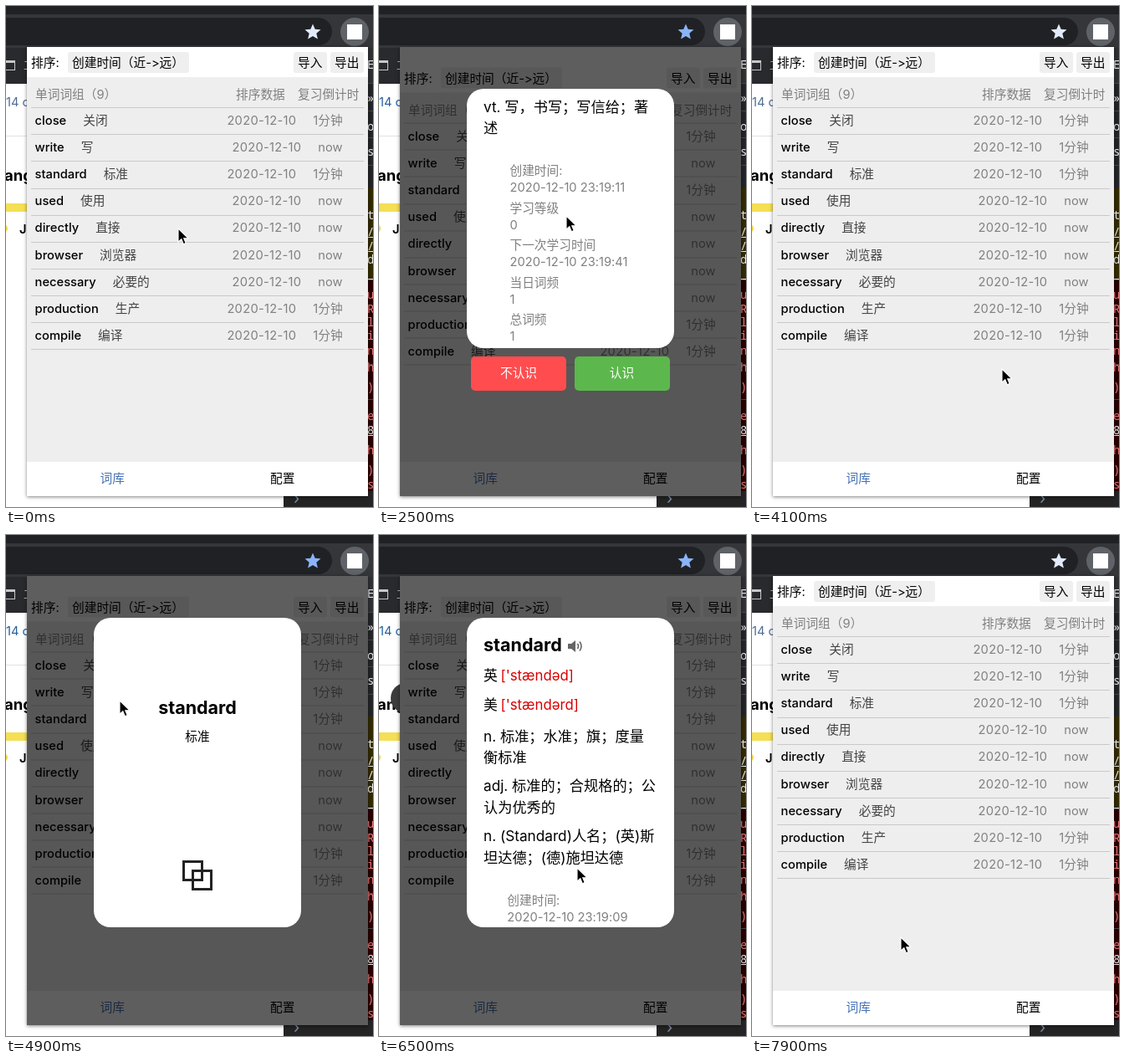
An HTML page that plays this animation: 439 by 599 pixels, repeating every 8000 ms.

```html
<!DOCTYPE html>
<html lang="zh-CN">
<head>
<meta charset="utf-8">
<title>单词卡片</title>
<style>
html, body { margin: 0; width: 100%; height: 100%; overflow: hidden; }
#stage {
  position: relative; width: 439px; height: 599px; overflow: hidden; background: #fff;
  font: 14.7px/20px Inter, "Noto Sans CJK SC", "Noto Sans CJK", sans-serif; color: #000;
  font-feature-settings: "calt" 0;
}
#stage div, #stage svg, .t { position: absolute; box-sizing: border-box; }
.t { white-space: pre; }
.gray { color: #808080; }
.mono { font-family: "Noto Sans Mono", monospace; font-size: 14px; }

#tabs { left: 0; top: 0; width: 439px; height: 10px; background: #202124; }
#bar { left: 0; top: 10px; width: 439px; height: 40px; background: #35363a; }
#omni { left: -20px; top: 14px; width: 410px; height: 33px; border-radius: 17px; background: #202124; }
#ext { left: 400px; top: 14px; width: 34px; height: 34px; border-radius: 50%; background: #5f6368; }
#ext div { left: 8px; top: 8px; width: 18px; height: 18px; background: #fff; }
.star { fill: #e2ebfb; animation: star 8s linear infinite; }
.stamp { color: #4d6c96; animation: stamp 8s linear infinite; }

#panel, #edge { left: 25px; top: 49px; width: 408px; height: 537px; }
#panel { overflow: hidden; background: #fff; }
#edge { box-shadow: 0 1px 4px rgba(0,0,0,.5); }
/* Panel children use stage coordinates. */
#inner { left: -25px; top: -49px; width: 439px; height: 599px; }
#list { left: 0; top: 0; width: 439px; height: 545px; animation: shift 8s linear infinite; }
#body { left: 25px; top: 85px; width: 408px; height: 470px; background: #eee; }
.box { background: #efefef; border-radius: 3px; height: 25px; top: 55px; }
.line { left: 30px; width: 398px; height: 1px; background: #c9c9c9; }
.row { left: 34.6px; width: 368px; display: flex; gap: 20px; white-space: pre; }
.row .word { font-weight: 450; }
.row .mean { font-weight: 300; color: #444; }
.end { right: 0; top: 0; display: flex; gap: 20px; color: #808080; }
.date { letter-spacing: .27px; }
.before { animation: before 8s step-end infinite; }
.after { animation: after 8s step-end infinite; }
#foot { left: 25px; top: 545px; width: 408px; height: 41px; background: #fff; }
#dim { inset: 0; background: rgba(0,0,0,.63); animation: card1 8s linear infinite; }
#dim.two { animation-name: card2; }
.shade { inset: 0; background: rgba(0,0,0,.63); }
.fade1 { animation: card1 8s linear infinite; }
.fade2 { animation: card2 8s linear infinite; }

.card { left: 105px; top: 99px; width: 248px; perspective: 900px; }
#c1 { height: 310px; }
#c2 { height: 370px; }
.flip { inset: 0; transform-style: preserve-3d; }
#c1 .flip { animation: flip1 8s ease-in-out infinite; }
#c2 .flip { animation: flip2 8s ease-in-out infinite; }
.face { inset: 0; border-radius: 20px; background: #fff; overflow: hidden; backface-visibility: hidden; }
.back { transform: rotateY(180deg); }
.mid { left: 0; right: 0; text-align: center; }
.big { font-size: 21.5px; font-weight: 700; }
.def { font-size: 17.2px; line-height: 25.3px; }
.ipa { color: #d80000; }
.meta { left: 122px; transform: translateX(-50%); line-height: 20px; }
.meta p { margin: 0 0 4.5px; white-space: pre; }
.scroll { inset: 0; }
#c1 .scroll { animation: scroll1 8s ease-in-out infinite; }
#c2 .scroll { animation: scroll2 8s ease-in-out infinite; }
.btn {
  top: 320px; width: 114px; height: 41px; border-radius: 5px; color: #fff;
  font-weight: 500; line-height: 41px; text-align: center;
}
#ball {
  left: 14px; top: 177px; width: 36px; height: 36px; border-radius: 50%;
  background: #3c3c3c; animation: ball 8s step-end infinite;
}
#mouse { left: 0; top: 0; animation: mouse 8s ease-in-out infinite; }

@keyframes shift { 0%, 4.9%, 47.6%, 56.2%, 95.1%, 100% { transform: none; }
  5%, 47.5%, 56.25%, 95% { transform: translateY(18.5px); } }
@keyframes star { 0%, 4.9%, 47.6%, 56.2%, 95.1%, 100% { fill: #e2ebfb; }
  5%, 47.5%, 56.25%, 95% { fill: #8ab4f8; } }
@keyframes stamp { 0%, 4.9%, 47.6%, 56.2%, 95.1%, 100% { color: #4d6c96; }
  5%, 47.5%, 56.25%, 95% { color: #235f9e; } }
@keyframes card1 { 0%, 5%, 49%, 100% { opacity: 0; } 7.4%, 46.25% { opacity: 1; } }
@keyframes card2 { 0%, 56.25%, 96.5%, 100% { opacity: 0; } 58.7%, 93.75% { opacity: 1; } }
@keyframes flip1 { 0%, 13.75% { transform: none; } 21.25%, 100% { transform: rotateY(180deg); } }
@keyframes flip2 { 0%, 70% { transform: none; } 78.75%, 100% { transform: rotateY(180deg); } }
@keyframes scroll1 { 0%, 24.4% { transform: none; } 27.5%, 100% { transform: translateY(-120px); } }
@keyframes scroll2 { 0%, 82.5% { transform: none; } 88.75%, 100% { transform: translateY(-180px); } }
@keyframes before { 0% { opacity: 1; } 46.25%, 100% { opacity: 0; } }
@keyframes after { 0% { opacity: 0; } 46.25%, 100% { opacity: 1; } }
@keyframes ball { 0% { opacity: 0; } 78.75% { opacity: 1; } 93.75%, 100% { opacity: 0; } }
@keyframes mouse {
  0% { transform: translate(206px, 266px); }
  5%, 7.5% { transform: translate(165px, 176px); }
  13.75%, 24.4% { transform: translate(225px, 346px); }
  27.5%, 31.25% { transform: translate(224px, 251px); }
  45% { transform: translate(298px, 436px); }
  51.25% { transform: translate(299px, 434px); }
  56.25% { transform: translate(135px, 200px); }
  61.25% { transform: translate(136px, 198px); }
  70%, 78.75% { transform: translate(235px, 402px); }
  81.25%, 88.75% { transform: translate(237px, 398px); }
  93.75%, 100% { transform: translate(178px, 481px); }
}
</style>
</head>
<body>
<div id="stage">
  <div id="page"></div>
  <div id="tabs"></div>
  <div id="bar"></div>
  <div id="omni"></div>
  <svg style="left:357px;top:21px" width="20" height="20" viewBox="-10 -10 20 20">
    <path class="star" d="M0-9.5 2.7-3.2 9.5-2.7 4.3 1.8 5.9 8.5 0 4.9-5.9 8.5-4.3 1.8-9.5-2.7-2.7-3.2Z"/>
  </svg>
  <div id="ext"><div></div></div>
  <div id="ball"></div>
  <div id="edge"></div>
  <div id="panel">
    <div id="inner">
      <div id="list">
        <div id="body"></div>
        <div class="box" style="left:74px;width:145px"></div>
        <div class="box" style="left:344px;width:40px"></div>
        <div class="box" style="left:388px;width:40px"></div>
      </div>
      <div id="foot"></div>
    </div>
    <div class="shade fade1"></div>
    <div class="shade fade2"></div>
  </div>

  <div id="c1" class="card fade1">
    <div class="flip">
      <div class="face">
        <div class="mid big" style="top:83px">write</div>
      </div>
      <div class="face back"><div class="scroll"></div></div>
    </div>
    <div class="btn" style="left:5px;background:#ff4d4f">不认识</div>
    <div class="btn" style="left:128.5px;background:#5cb84c">认识</div>
  </div>

  <div id="c2" class="card fade2">
    <div class="flip">
      <div class="face">
        <div class="mid big" style="top:97px">standard</div>
        <div class="mid" style="top:132px">标准</div>
      </div>
      <div class="face back"><div class="scroll"></div></div>
    </div>
  </div>

  <svg id="mouse" width="16" height="22" viewBox="-1 -1 16 22" style="margin:-1px">
    <path d="M0 0V16.2L3.8 12.7 6.3 18.8 9.2 17.6 6.7 11.7H11.8Z" fill="#000" stroke="#fff" stroke-width="1.1"/>
  </svg>
</div>
<script>
const $ = s => document.querySelector(s);
const add = (to, html) => to.insertAdjacentHTML('beforeend', html);
// Places a line of text by its left edge and vertical centre.
const text = (to, x, y, str, cls = '', css = '') =>
  add(to, `<span class="t ${cls}" style="left:${x}px;top:${y - 10}px;${css}">${str}</span>`);
const rect = (to, x, y, w, h, fill) =>
  add(to, `<div style="left:${x}px;top:${y}px;width:${w}px;height:${h}px;background:${fill}"></div>`);

// Page and developer tools around the popup
const page = $('#page');
rect(page, 0, 50, 25, 43, '#292a2d');
add(page, '<div style="left:-3px;top:65px;width:14px;height:12px;border:1.5px solid #c8c8c8;border-top-width:3px"></div>');
text(page, 21, 70, '工', '', 'color:#bbb;font-size:13px');
text(page, 0, 115, '14 c', 'stamp');
rect(page, 0, 155, 25, 1, '#e2e2e2');
text(page, -2, 202, 'ang', '', 'font-size:18.5px;font-weight:700');
rect(page, 0, 236, 25, 10, '#f4df55');
add(page, '<div style="left:-8px;top:261px;width:10px;height:10px;border-radius:50%;background:#f4d84a"></div>');
text(page, 16, 267, 'J', '', 'font-weight:600');
rect(page, 332, 580, 107, 19, '#242424');
text(page, 344, 589, '›', '', 'font-size:19px;color:#7d8ea5');
rect(page, 433, 50, 6, 549, '#242528');
rect(page, 433, 50, 6, 42, '#303134');
rect(page, 433, 217, 6, 110, '#332b00');
rect(page, 433, 328, 6, 252, '#290000');
for (const y of [92, 125, 157, 190, 428, 470]) rect(page, 433, y, 6, 1, '#484848');
const side = [['E', 70], ['»', 110], ['op', 144], ['s', 174], ['t', 250], ['/', 270], ['/', 287], ['d', 303], ['_', 320],
  ['u', 345], ['R', 362], ['l', 378], ['i', 394], ['n', 412], ['h', 432], [')', 455], ['e', 490], ['8', 507], ['h', 531], [')', 554], ['s', 572]];
for (const [s, y] of side) {
  const color = y > 330 && s !== '8' ? '#f07878' : '#eee';
  const under = '/8'.includes(s) ? 'underline' : 'none';
  text(page, 432, y, s, 'mono', `color:${color};text-decoration:${under}`);
}

// Word list
const list = $('#list'), today = '2020-12-10', pitch = 32.1;
text(list, 30, 68, '排序:');
text(list, 79, 68, '创建时间（近-&gt;远）');
text(list, 349, 68, '导入');
text(list, 393, 68, '导出');
text(list, 35, 106, '单词词组（9）', 'gray');
text(list, 275, 106, '排序数据', 'gray');
text(list, 349, 106, '复习倒计时', 'gray');
rect(list, 30, 121, 398, 1, '#c9c9c9');

const end = (left, cls = '') => `<div class="end ${cls}"><span class="date">${today}</span><span>${left}</span></div>`;
const soon = '1分钟';
const words = [
  ['close', '关闭', soon], ['write', '写'], ['standard', '标准', soon],
  ['used', '使用', 'now'], ['directly', '直接', 'now'], ['browser', '浏览器', 'now'],
  ['necessary', '必要的', 'now'], ['production', '生产', soon], ['compile', '编译', soon]
];
words.forEach(([word, mean, left], i) => {
  const tail = left ? end(left) : end('now', 'before') + end(soon, 'after');
  add(list, `<div class="row" style="top:${127 + i * pitch}px">
    <span class="word">${word}</span><span class="mean">${mean}</span>${tail}</div>
    <div class="line" style="top:${Math.round(153.3 + i * pitch)}px"></div>`);
});
text($('#inner'), 112.5, 565, '词库', '', 'color:#4772b5');
text($('#inner'), 316, 565, '配置');

// Cards
const icon = `<svg style="left:106px;bottom:44px" width="36" height="36" fill="none" stroke="#222" stroke-width="3">
  <path d="M1.5 1.5H23.5V23.5H1.5ZM12.5 12.5H34.5V34.5H12.5Z"/></svg>`;
const speaker = `<svg width="18" height="16" viewBox="0 0 18 16" fill="none" stroke="#666" stroke-width="1.6">
  <path d="M0 5H4L9 1V15L4 11H0Z" fill="#666" stroke="none"/><path d="M11.5 5Q13.5 8 11.5 11M14 2.5Q18 8 14 13.5"/></svg>`;

function fill(id, word, speakerX, ipa, defs, meta) {
  const back = $(id + ' .scroll');
  add($(id + ' .face'), icon);
  text(back, 20, 32, word, 'big');
  add(back, `<div style="left:${speakerX}px;top:26px">${speaker}</div>`);
  ['英', '美'].forEach((c, i) =>
    text(back, 20, 69 + i * 34.5, `${c} <span class="ipa" style="margin-left:-1px">${ipa[i]}</span>`, '', 'font-size:16.8px'));
  let y = 128.5;
  for (const lines of defs) {
    add(back, `<div class="def" style="left:20px;top:${y}px;white-space:pre">${lines.join('\n')}</div>`);
    y += lines.length * 25.3 + 9.3;
  }
  const rows = ['创建时间:', '学习等级', '下一次学习时间', '当日词频', '总词频'];
  add(back, `<div class="meta gray" style="top:${y + 20}px">${rows.map((r, i) => `<p>${r}\n${meta[i]}</p>`).join('')}</div>`);
}
fill('#c1', 'write', 80, ['[raɪt]', '[raɪt]'],
  [['vt. 写，书写；写信给；著', '述']],
  [today + ' 23:19:11', 0, today + ' 23:19:41', 1, 1]);
fill('#c2', 'standard', 121, ["['stændəd]", "['stændərd]"],
  [['n. 标准；水准；旗；度量', '衡标准'], ['adj. 标准的；合规格的；公', '认为优秀的'], ['n. (Standard)人名；(英)斯', '坦达德；(德)施坦达德']],
  [today + ' 23:19:09', 1, today + ' 23:20:09', 1, 1]);
</script>
</body>
</html>
```
